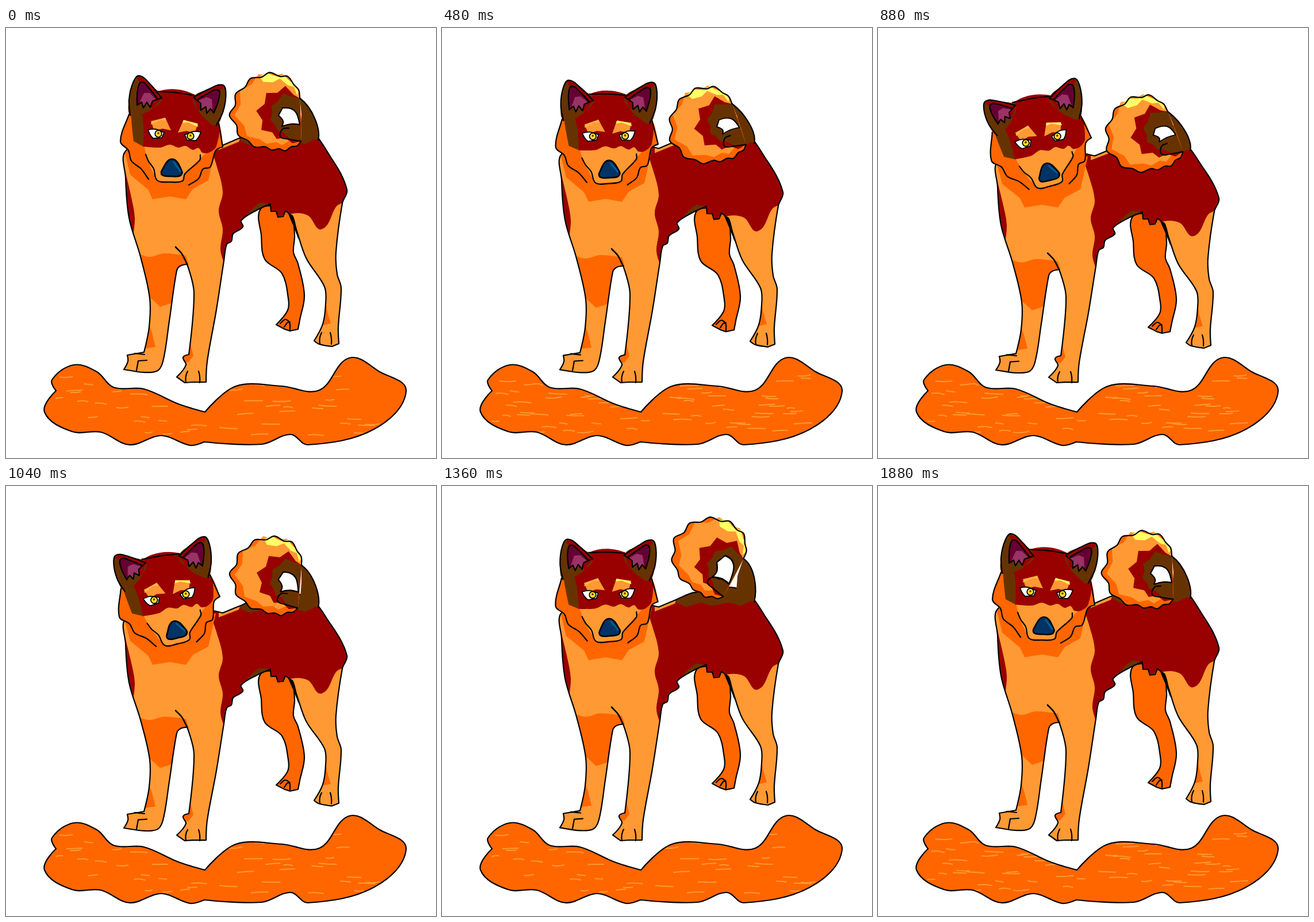
Write an HTML page that moves like this. It is 748 by 748 pixels and loops after 1.92 s.

```html
<!DOCTYPE html>
<html lang="en">
<head>
<meta charset="utf-8">
<title>Dog</title>
<style>
html, body { margin: 0; width: 100%; height: 100%; overflow: hidden; background: #fff; }
svg { display: block; width: 100vw; height: 100vh; }
path { stroke-linecap: round; stroke-linejoin: round; }
</style>
</head>
<body>
<svg id="stage" viewBox="0 0 748 748"></svg>
<script>
const LIGHT = '#ff9933', DARK = '#ff6600', RED = '#990000', BROWN = '#663300';
const YELLOW = '#ffff66', PLUM = '#660033', MAUVE = '#993366', INK = '#000';
const stage = document.getElementById('stage');

const node = (parent, tag, attrs = {}) => {
  const el = document.createElementNS('http://www.w3.org/2000/svg', tag);
  for (const a in attrs) el.setAttribute(a, attrs[a]);
  return parent.appendChild(el);
};
const group = (parent, transform = '') => node(parent, 'g', { transform });
const move = (el, transform) => el.setAttribute('transform', transform);
const poly = s => `M${s}Z`;

// Rounded curve through key points; "!" marks a sharp corner
function smooth(text, open) {
  const p = text.trim().split(/\s+/).map(s => ({ xy: s.replace('!', '').split(',').map(Number), sharp: s.endsWith('!') }));
  const n = p.length;
  const at = i => open ? p[Math.max(0, Math.min(n - 1, i))] : p[(i + n) % n];
  const handle = (i, reach) => {
    const [x, y] = at(i).xy, [ax, ay] = at(i - 1).xy, [bx, by] = at(i + 1).xy;
    const k = at(i).sharp ? 0 : reach / (Math.hypot(bx - ax, by - ay) || 1);
    return [x + (bx - ax) * k, y + (by - ay) * k];
  };
  let d = 'M' + p[0].xy;
  for (let i = 0; i < (open ? n - 1 : n); i++) {
    const [x, y] = at(i).xy, [u, v] = at(i + 1).xy;
    const reach = 0.34 * Math.hypot(u - x, v - y);
    d += `C${handle(i, reach)} ${handle(i + 1, -reach)} ${u},${v}`;
  }
  return open ? d : d + 'Z';
}
const fill = (parent, d, color) => node(parent, 'path', { d, fill: color });
const line = (parent, d, width = 2.2, color = INK) =>
  node(parent, 'path', { d, fill: 'none', stroke: color, 'stroke-width': width });
const shape = (parent, d, color, width) => {
  fill(parent, d, color);
  return line(parent, d, width);
};
const clipped = (id, d) => {
  node(node(stage, 'clipPath', { id }), 'path', { d });
  return `url(#${id})`;
};

// ground with two sets of seeded marks
const land = smooth(`80,612 118,586 158,598 187,625 240,628 300,654 346,668! 400,623 480,623 545,630
  597,574 650,598 696,632 640,698 525,725 495,707 445,724 345,720! 320,726 270,709 215,725 165,703
  115,702 67,668 87,631!`);
fill(stage, land, DARK);
const soil = group(stage);
soil.setAttribute('clip-path', clipped('land', land));
line(stage, land);

function hatch(seed, count) {
  const random = () => (seed = (seed * 16807) % 2147483647) / 2147483647;
  let d = '';
  for (let i = 0; i < count; i++) {
    const length = 12 + 20 * random();
    const x = 87 + 550 * (i * 0.618 % 1), y = 602 + 108 * random();
    d += `M${x},${y}q${length / 2},${2 - 4 * random()} ${length},${2 - 4 * random()}`;
  }
  return line(soil, d, 2, LIGHT);
}
const marks = [hatch(41, 52), hatch(97, 84)];

// body, squashed towards the feet
const body = group(stage);
shape(body, smooth(`442,316 444,360 450,402 480,427 491,470 490,491 470,516! 485,524! 494,527! 508,524!
  511,508 519,465 508,410 500,390 502,360 495,322 470,310`), DARK);
line(body, smooth('477,514 486,507 494,512', true));
line(body, smooth('484,520 492,512 494,525', true));

const front = `377,204! 300,185! 210,212 208,260 214,330 234,398 250,470 249,520 240,564! 211,569!
  212,580 205,594! 229,598! 262,597 273,580 284,510 297,422 303,414 315,411! 327,460 318,568! 308,573
  313,586 297,607! 311,617! 325,616! 348,616! 350,580 366,490 379,405 `;
const rear = `384,376 392,371 395,358 412,346 409,335 436,317 460,306! 461,319! 470,319! 473,329!
  482,328! 486,318! 492,322! 503,345 522,400 554,450 556,480 551,515 536,544! 545,550 567,554! 579,549!
  578,520 583,452 576,428 574,390 585,305 593,281 565,225 520,173 440,178 405,192`;
const torso = smooth(front + rear);
fill(body, torso, LIGHT);
const coat = group(body);
coat.setAttribute('clip-path', clipped('torso', torso));
fill(coat, smooth(`350,190! 365,235 377,285 370,318 377,350 373,385 379,408! 440,340! 497,323 525,326
  549,350 575,310 586,304! 610,290! 520,150!`), RED);
fill(coat, poly('370,212 405,198 412,180 370,190'), LIGHT);
fill(coat, poly('405,192 411,198 425,204 450,196 470,202 500,196 520,202 540,192 520,160 440,165'), BROWN);
fill(coat, smooth('408,340! 436,323 464,309! 440,305'), BROWN);
fill(coat, smooth('205,240! 217,290 224,330 221,362! 205,330!'), RED);
fill(coat, poly('205,210 216,255 247,281 255,298 285,293 313,298 325,280 352,265 365,205'), DARK);
fill(coat, smooth('228,392! 250,398 275,392 313,396! 318,412! 299,420 290,478! 268,485! 251,469! 240,440'), DARK);
fill(coat, poly('249,516 254,530 260,555 238,558'), DARK);
fill(coat, poly('319,542 326,570 317,582 300,576'), DARK);
fill(coat, poly('555,462 558,490 565,514 545,518'), DARK);
line(body, torso);
line(body, smooth('295,381 306,393 315,411', true), 2.6);
line(body, 'M245,578L230,579L227,596M224,566L241,568');
const toes = (x, y, gap) => {
  for (const side of [0, 1])
    line(body, `M${x + gap * side},${y}q${side * 8 - 5},9 ${side * 5 - 3},20`);
};
toes(316, 597, 19);
toes(549, 530, 15);
fill(body, smooth('490,321! 500,328 509,369! 501,347'), INK);

// tail: a curl of zigzag bands that turns on a root
const tail = group(stage);
const root = fill(tail, '', BROWN);
const curl = group(tail);
const HOLE = [490, 155], TURN_AT = [522, 146];
const REACH = [48, 56, 63, 85, 98, 95, 84, 67, 39];

function band(scale, teeth, depth, from = 0, to = 1) {
  const dots = [];
  for (let i = 0; i <= teeth; i++) {
    const u = from + (to - from) * i / teeth;
    const j = Math.min(REACH.length - 2, Math.floor(u * 8)), f = u * 8 - j;
    const wave = i % teeth ? (i % 2 ? 1 + depth : 1 - depth) : 1;
    const r = (REACH[j] * (1 - f) + REACH[j + 1] * f) * wave * scale(u);
    const a = (61 + 242 * u) * Math.PI / 180;
    dots.push([HOLE[0] + r * Math.cos(a), HOLE[1] + r * Math.sin(a)].map(v => v.toFixed(1)).join());
  }
  return dots.join(' ');
}
const inner = size => u => 1 - (1 - size) * Math.sin(Math.PI * u) ** 0.6;
const rim = band(() => 1, 22, 0.035);
fill(curl, smooth(rim + '!'), DARK);
fill(curl, poly(band(u => Math.min(1, 0.8 + 0.4 * u * u), 18, 0.05)), LIGHT);
fill(curl, poly(band(() => 0.99, 6, 0.04, 0.72, 0.96) + ' ' + band(() => 0.86, 5, 0.06, 0.96, 0.72)), YELLOW);
fill(curl, poly(band(inner(0.52), 13, 0.1)), RED);
fill(curl, poly(band(inner(0.3), 11, 0.08)), BROWN);
line(curl, smooth(rim, true));
line(curl, smooth('513,197 490,193 477,189 481,176 492,174', true));
const hole = shape(group(curl), smooth('474,152! 481,139! 495,140 505,148 511,168! 496,167 480,171! 482,162'), '#fff').parentNode;
const rootLine = line(tail, '');

// head
const head = group(stage);
const leftCheek = '214,150 199,197 213,213 218,231 235,245 248,263 ';
const rightCheek = '318,273 335,262 343,245 355,242 365,213 377,207! 370,165';
fill(head, smooth(leftCheek + '263,266! 307,267! ' + rightCheek + ' 330,117 265,110 235,120'), DARK);
fill(head, smooth('240,203! 247,231 263,266! 307,267! 311,254 337,228 352,214! 320,200 280,198'), LIGHT);
fill(head, smooth(`238,206! 235,150 266,110 330,117 369,165 366,205 355,216 342,217 335,209 325,212
  312,205 300,208 285,203 268,208`), RED);
fill(head, smooth('217,135! 236,148 239,206! 222,197! 219,170'), BROWN);
line(head, smooth('262,110 300,113 330,118', true));
line(head, smooth(leftCheek, true));
line(head, smooth(rightCheek, true));
line(head, smooth('243,220 248,232 257,245 263,265 285,268 307,266 311,254 337,230 338,221', true));

// ear around the middle of its base; the right one is a mirror image
function ear(place) {
  const el = group(group(head, place));
  const edge = '-27,14 -29,-13 -22,-43 -11,-55 9,-39 28,-16';
  fill(el, smooth(edge + ' 12,2 -8,12'), BROWN);
  fill(el, smooth('-14,-50! -11,-54 9,-39 28,-16! 12,2!'), RED);
  const inside = '-15,-4 -14,-30 -7,-44 7,-32 21,-14';
  const fringe = ' 12,-11 8,0 2,-9 -4,1 -7,-9 ';
  fill(el, smooth(inside + fringe.replace(/(\d) /g, '$1! ')), PLUM);
  fill(el, poly('-11,-8 -3,-25 7,-25 18,-14' + fringe), MAUVE);
  line(el, smooth(edge, true));
  line(el, smooth(inside, true));
  line(el, 'M28,-16L21,-14L' + fringe + '-15,-4');
  return el;
}
const leftEar = ear('translate(243 138)');
ear('translate(346 146) rotate(22) scale(-1 1)');

function eye(place, shade, glow) {
  const el = group(head, place);
  fill(el, poly('-13,-22 12,-28 22,-6 7,-9 -7,-5'), shade);
  fill(el, poly('-12,-21 12,-28 14,-23 4,-24 -13,-16'), glow);
  shape(el, smooth('-18,-7! -5,-8 10,-2! 6,7! -9,8! -14,2'), '#fff', 1.8);
  node(el, 'circle', { r: 5.8, fill: '#ffdd22', stroke: INK, 'stroke-width': 1.8 });
  node(el, 'circle', { r: 1.8, cy: -1, fill: BROWN });
}
eye('translate(265 184)', LIGHT, '#ffb74d');
eye('translate(321 188) scale(-1 1)', LIGHT, YELLOW);

shape(head, smooth('289,228 306,249 303,257 288,258 272,256 271,248'), '#003366', 2.6);
line(head, 'M292,233L303,249', 2.4, '#006699');

const STEP = 40, COUNT = 48, LAST = COUNT - 1;
const sway = k =>
  k <= 17 ? 0.6 * (k / 17) ** 2 :
  k <= 33 ? 0.6 * Math.cos((k - 17) / 16 * Math.PI) :
  -0.6 * ((LAST - k) / 14) ** 2;

function pose(k) {
  const q = (Math.min(k, LAST - k) / 23) ** 2;
  const turn = sway(k);
  move(body, `translate(0 ${618 * 0.0487 * q}) scale(1 ${1 - 0.0487 * q})`);
  move(head, `translate(0 ${8.5 * q}) rotate(${-17.5 * q} 290 216)`);
  move(leftEar, `rotate(${-22 * q ** 3}) scale(1 ${1 - 0.15 * q ** 3})`);

  move(tail, `translate(0 ${20 * q})`);
  move(curl, `rotate(${-turn * 180 / Math.PI} ${TURN_AT})`);
  move(hole, `translate(${HOLE}) scale(1 ${1 - 0.7 * turn}) translate(${HOLE.map(v => -v)})`);
  const c = Math.cos(turn), s = Math.sin(turn);
  const dx = 511 - TURN_AT[0], dy = 122 - TURN_AT[1];
  const x = TURN_AT[0] + dx * c + dy * s, y = TURN_AT[1] + dy * c - dx * s;
  const back = `M543,195C548,176 ${x + 22},${y + 16} ${x},${y}`;
  root.setAttribute('d', back + 'L514,150L512,176L528,190Z');
  rootLine.setAttribute('d', back);

  const shown = k % 8 < 4 ? 0 : 1;
  marks.forEach((m, i) => { m.style.display = i === shown ? '' : 'none'; });
}

const start = performance.now();
function tick() {
  pose(Math.floor(Math.max(0, performance.now() - start) / STEP) % COUNT);
  requestAnimationFrame(tick);
}
tick();
</script>
</body>
</html>
```
